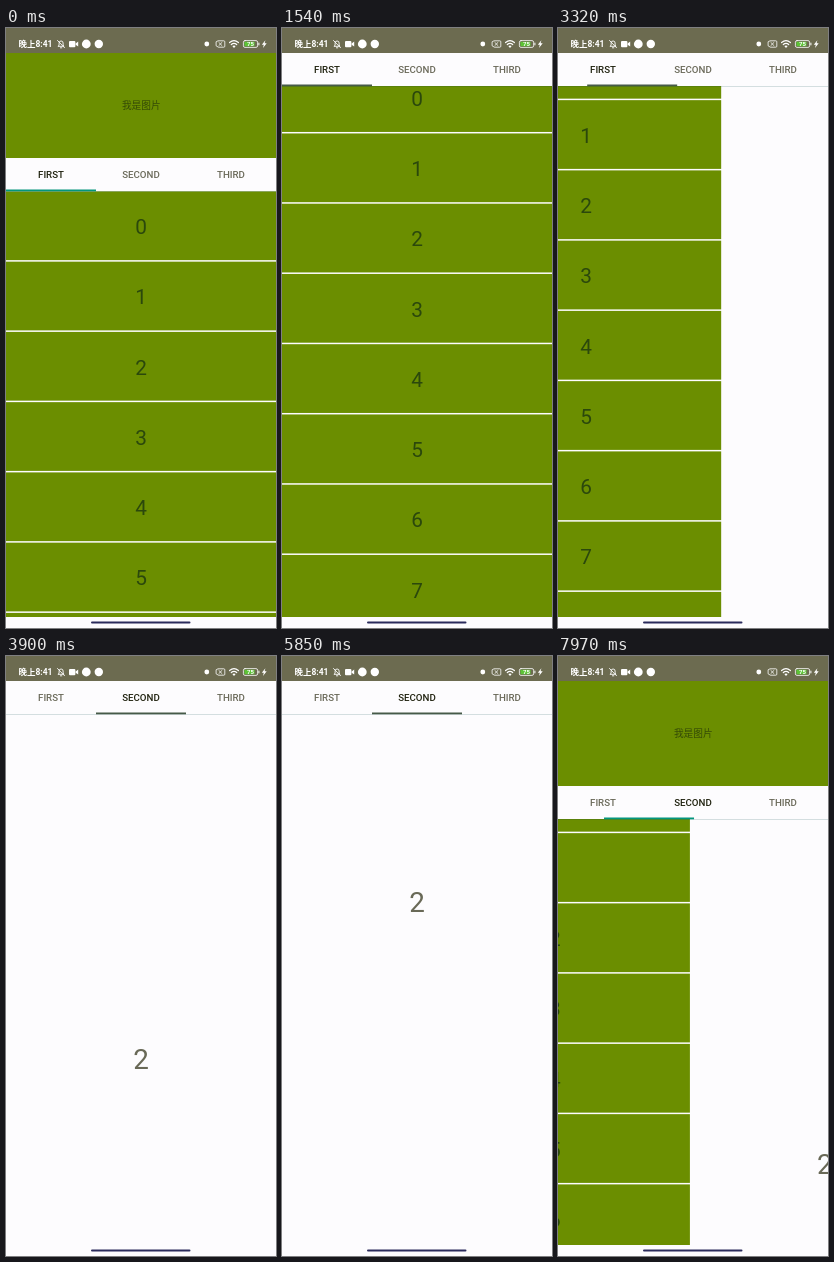
An HTML page that plays this animation: 270x600 px, repeating every 8 s.

```html
<!DOCTYPE html>
<html lang="zh">
<head>
<meta charset="utf-8">
<title>Collapsing tabs</title>
<style>
  html, body { margin: 0; width: 100%; height: 100%; overflow: hidden; background: #fdfcfe; }
  svg { display: block; width: 270px; height: 600px; font-family: Roboto, "Noto Sans CJK SC", "Noto Sans CJK", sans-serif; }
  text { text-anchor: middle; }
  .row { fill: #6b8e00; }
  .num { font-size: 20.8px; fill: #2b480c; }
  .tab { font-size: 9.7px; font-weight: 500; fill: #6b6a5a; }
  .tab.on { fill: #20220f; }
  .clock { font-size: 8.5px; font-weight: 700; fill: #fff; text-anchor: start; }
  .line { fill: none; stroke: #fff; stroke-linecap: round; stroke-linejoin: round; }
</style>
</head>
<body>
<svg viewBox="0 0 270 600">
  <rect width="270" height="600" fill="#fdfcfe"/>

  <g id="pager">
    <g id="list"></g>
    <g id="second"><text x="405" y="517.8" font-size="27.8" fill="#696957">2</text></g>
  </g>

  <g id="header">
    <rect y="25" width="270" height="105" class="row"/>
    <text x="135.3" y="81.4" font-size="9.7" fill="#344a06">我是图片</text>
    <rect y="130" width="270" height="33" fill="#fdfcfe"/>
    <rect y="163" width="270" height="1" fill="#004048" opacity=".16"/>
    <text id="tab1" class="tab" x="45" y="150">FIRST</text>
    <text id="tab2" class="tab" x="135" y="150">SECOND</text>
    <text class="tab" x="225" y="150">THIRD</text>
    <rect id="mark" y="161.5" width="90" height="1.8"/>
  </g>

  <rect width="270" height="25" fill="#6c6b50"/>
  <g fill="#fff">
    <text class="clock" x="12.6" y="19">晚上</text>
    <text class="clock" x="29.4" y="19.1">8:41</text>
    <path class="line" d="M52.3 18.3h5.6l-.8-1.3v-2a2 2 0 0 0-4 0v2zM54.4 19.8h1.4M51.5 12.5l7 7.2" stroke-width=".9"/>
    <rect x="63" y="13" width="6.4" height="6.2" rx="1"/>
    <path d="M69.6 15.4l2.6-1.8v5l-2.6-1.8z"/>
    <circle cx="80.3" cy="16" r="4.4"/>
    <circle cx="92.8" cy="16" r="4.2"/>
    <circle cx="200.8" cy="16" r="2.4"/>
    <path class="line" d="M212.4 12.8h5.4a1 1 0 0 1 1 1v4.4a1 1 0 0 1-1 1h-5.4l-2.3-1.4v-3.6zM212.9 14.5l3 3M215.9 14.5l-3 3" stroke-width=".8"/>
    <path class="line" d="M223.6 14.5q4.4-3.6 8.8 0M225.3 16.5q2.7-2.2 5.4 0" stroke-width="1.2"/>
    <path d="M226.3 18.1q1.7-1.2 3.4 0L228 20z"/>
    <rect class="line" x="237.4" y="12.6" width="14.2" height="6.8" rx="1.6" stroke-width=".8"/>
    <rect x="238.5" y="13.7" width="10" height="4.6" rx=".6" fill="#5cc435"/>
    <rect x="252.4" y="14.7" width="1" height="2.6"/>
    <text x="244.4" y="18.3" font-size="6" font-weight="700">75</text>
    <path d="M259.4 12.2l-3.6 4.5h2l-.8 3.2 3.7-4.6h-2.1z"/>
  </g>

  <rect y="589" width="270" height="11" fill="#fdfcfe"/>
  <rect x="85" y="593.4" width="99.5" height="2" rx="1" fill="#2a2b5c"/>
</svg>

<script>
const LOOP = 8000;
const WIDTH = 270;
const TAB = WIDTH / 3;
const TOP = 105;      // how far the header collapses
const PITCH = 70.25;

const $ = id => document.getElementById(id);
const list = $("list"), second = $("second"), pager = $("pager");
const header = $("header"), mark = $("mark");

list.innerHTML = Array.from({ length: 10 }, (_, i) => {
  const y = i * PITCH;
  return `<rect class="row" y="${163.4 + y}" width="${WIDTH}" height="68.75"/>` +
         `<text class="num" x="135" y="${206 + y}">${i}</text>`;
}).join("");

// Progress from 0 to 1 between two times; a power under 1 starts faster.
function ease(t, start, end, power = 1) {
  const u = Math.min(1, Math.max(0, (t - start) / (end - start))) ** power;
  return u * u * (3 - 2 * u);
}

const move = (el, x, y) => el.setAttribute("transform", `translate(${x} ${y})`);
const inner = total => Math.max(0, total - TOP);

function draw(t) {
  // Drag distance of each page: the header takes the first part, the page the rest.
  const listDrag = 161.5 * ease(t, 1080, 1900, .6);
  const secondDrag = TOP * (1 - ease(t, 4030, 4440))
    + 267 * (ease(t, 5010, 5926) - ease(t, 6240, 6981));
  const top = -Math.min(TOP, t < 4000 ? listDrag : secondDrag);

  const swipe = time => ease(time, 3060, 3667);
  const back = ease(t, 7681, 8270);
  const page = swipe(t) - back;

  move(header, 0, top);
  move(list, 0, top - inner(listDrag));
  move(second, 0, top - inner(secondDrag));
  move(pager, -WIDTH * page, 0);
  move(mark, TAB * (swipe(t - 30) - back), 0);

  const fold = -top / TOP;
  mark.setAttribute("fill", `rgb(${4 + 66 * fold},${150 - 60 * fold},${125 - 53 * fold})`);
  $("tab1").classList.toggle("on", page < .5);
  $("tab2").classList.toggle("on", page >= .5);
}

function tick() {
  draw(performance.now() % LOOP);
  requestAnimationFrame(tick);
}
tick();
</script>
</body>
</html>
```
